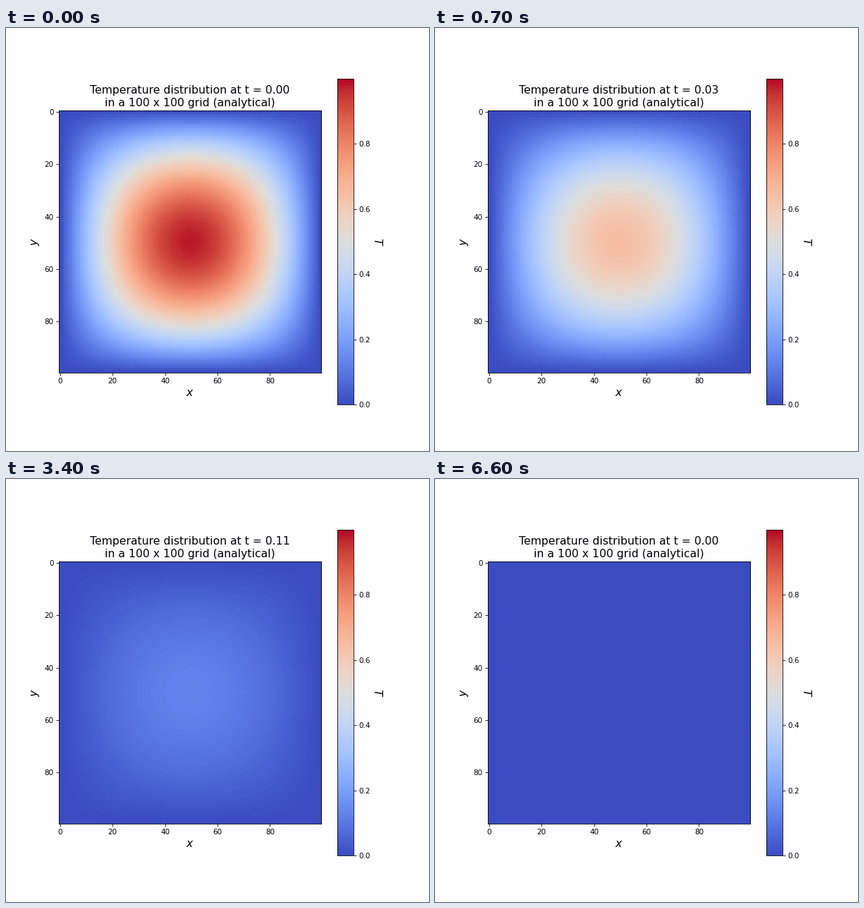
Animation of 600 by 600 pixels, one loop 6.7 s. Source, as a matplotlib script:

```python
import numpy as np
import matplotlib.pyplot as plt
from matplotlib.animation import FuncAnimation

GRID = 100
FRAMES = 67
INTERVAL = 100      # ms
STEP = 0.003        # simulated time per frame
FIELD_START = 0.001
CLOCK_START = 0.0042
PAPER = "#fefdff"

plt.rcParams["font.family"] = "DejaVu Sans"

wave = np.sin(np.pi * np.linspace(0, 1, GRID))
mode = np.outer(wave, wave)


def temperature(t):
    """Heat equation on the unit square with cold edges."""
    return mode * np.exp(-2 * np.pi**2 * t)


def heading(t):
    return (f"Temperature distribution at t = {t:.2f}\n"
            f"in a {GRID} x {GRID} grid (analytical)")


fig, ax = plt.subplots(figsize=(8, 8), dpi=75, facecolor=PAPER)
image = ax.imshow(temperature(FIELD_START), cmap="coolwarm",
                  vmin=0, vmax=mode.max())
title = ax.set_title(heading(0), fontsize=15)
ax.set_xlabel("$x$", fontsize=15)
ax.set_ylabel("$y$", fontsize=15)

bar = fig.colorbar(image, ax=ax, ticks=np.arange(0, 1, 0.2))
bar.ax.text(526.5 / 600, 297 / 600, "$T$", transform=fig.transFigure,
            fontsize=15, rotation=270, ha="center", va="center")


def update(i):
    if i == FRAMES - 1:  # the run ends on an empty grid
        image.set_data(np.zeros_like(mode))
        title.set_text(heading(0))
    else:
        image.set_data(temperature(FIELD_START + STEP * i))
        title.set_text(heading(CLOCK_START + STEP * i))
    return image, title


anim = FuncAnimation(fig, update, frames=FRAMES, interval=INTERVAL,
                     repeat=True, repeat_delay=0, blit=False)
plt.show()
```
